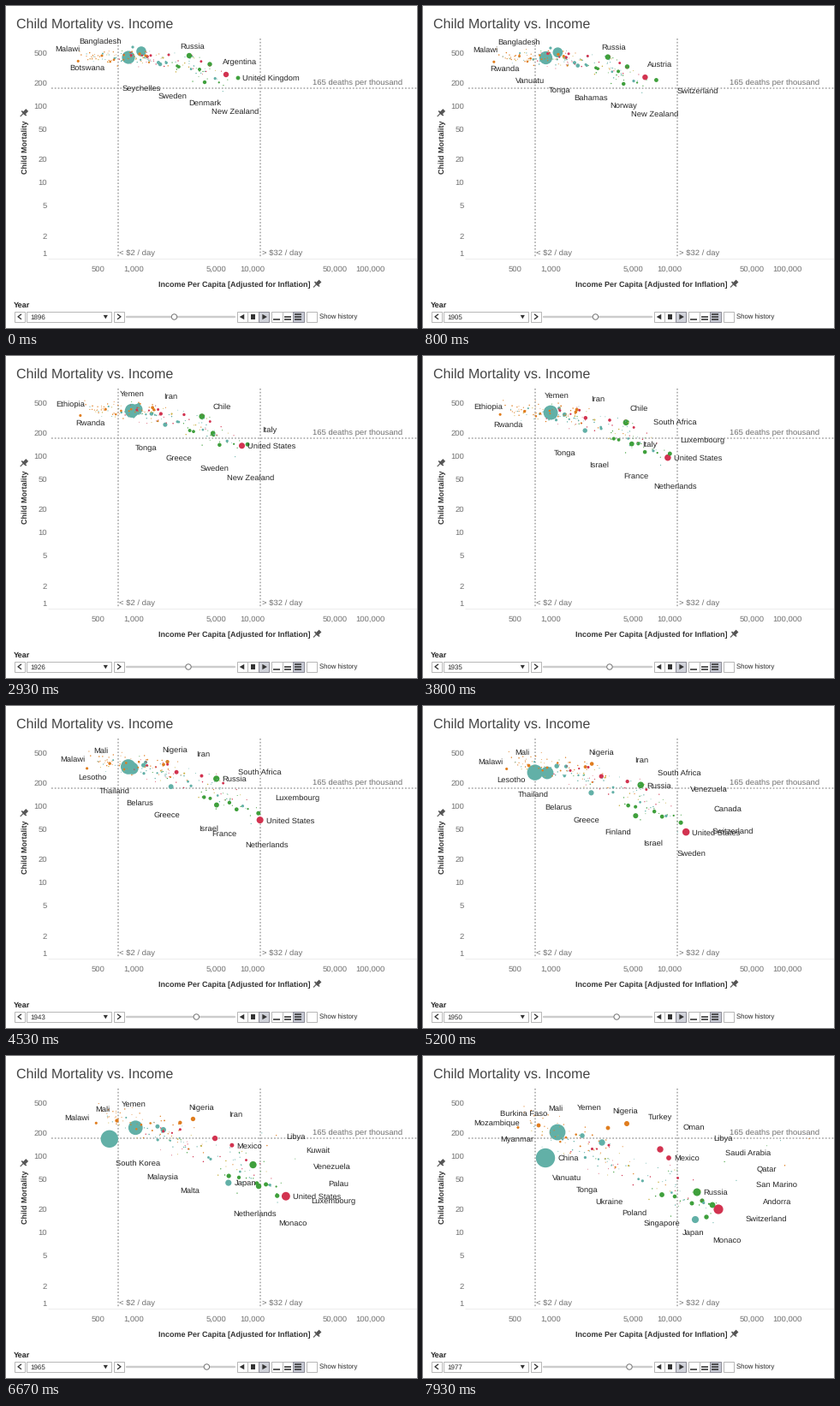
These frames come from a looping animation (480 by 376 pixels, 8000 ms). A matplotlib script:

```python
import matplotlib.pyplot as plt
import numpy as np
from matplotlib.animation import FuncAnimation
from matplotlib.patches import Circle, Polygon, Rectangle

W, H, DPI = 480, 376, 100
PX = 72 / DPI
FRAMES, STEP = 160, 50
FIRST, LAST = 1896, 1977
YEAR_MS = 97.5

plt.rcParams["font.family"] = "Liberation Sans"
plt.rcParams["text.hinting"] = "none"

TEAL, GREEN, RED = "#62b0a7", "#3fa03c", "#d23350"
ORANGE, YELLOW = "#e07d1e", "#cdb44a"
INK, DARK, GREY, LINE = "#262626", "#333333", "#707070", "#b8b8b8"

fig = plt.figure(figsize=(W / DPI, H / DPI), dpi=DPI, facecolor="white")


def pixel_axes(x0, y0, x1, y1):
    """Transparent axes whose data units are stage pixels, y downwards."""
    ax = fig.add_axes([x0 / W, 1 - y1 / H, (x1 - x0) / W, (y1 - y0) / H])
    ax.set(xlim=(x0, x1), ylim=(y1, y0))
    ax.axis("off")
    return ax


stage = pixel_axes(0, 0, W, H)
plot = pixel_axes(53, 37, W, 295)


def write(x, y, text, size=9.5, color=GREY, ax=stage, **kw):
    """Text whose capitals are centred on y."""
    return ax.text(x, y + 0.36 * size, text, fontsize=size * PX, color=color,
                   va="baseline", **kw)


def stroke(xs, ys, color=LINE, width=1.0, **kw):
    kw.setdefault("solid_capstyle", "butt")
    stage.plot(xs, ys, color=color, lw=width * PX, **kw)


def dotted(xs, ys):
    stroke(xs, ys, "#adadad", 1.7, linestyle=(0, (1, 1.25)),
           dash_capstyle="butt")


def box(x, width, fill="white", edge=LINE):
    stage.add_patch(Rectangle((x, 356.5), width, 12.5, fc=fill, ec=edge,
                              lw=PX, zorder=2))


def polygon(x, y, r, sides, turn):
    """Regular control glyph centred on (x, y)."""
    a = turn + 2 * np.pi * np.arange(sides) / sides
    stage.add_patch(Polygon(np.column_stack([x + r * np.cos(a),
                                             y + r * np.sin(a)]),
                            fc=DARK, ec="none", zorder=4))


def pin(x, y):
    stroke([x - 4.5, x], [y + 4, y - 0.5], "#555555", 1.1)
    stroke([x - 3, x + 2.5], [y - 2.5, y + 3], "#555555", 1.6)
    stroke([x - 1, x + 3.5], [y + 1, y - 3.5], "#555555", 4)


# --- chart frame: log scales -------------------------------------------------
def income_x(dollars):
    return 108 + 138 * np.log10(dollars / 500)


def deaths_y(rate):
    return 54 + 89.3 * np.log10(500 / rate)


write(12, 19.5, "Child Mortality vs. Income", 16, "#444444")
for rate in (500, 200, 100, 50, 20, 10, 5, 2, 1):
    write(48, min(deaths_y(rate), 288.5), str(rate), ha="right")
for dollars in (500, 1000, 5000, 10000, 50000, 100000):
    write(income_x(dollars), 306.5, f"{dollars:,}", ha="center")

stroke([49, W], [294.5, 294.5], "#ededed")
for per_day, sign in ((2, "<"), (32, ">")):
    x = income_x(per_day * 365)
    dotted([x, x], [38, 294])
    write(x + 1.8, 288, f"{sign} ${per_day} / day")
dotted([53, W], [deaths_y(165) - 0.5] * 2)
write(358, 88.5, "165 deaths per thousand")

write(178, 324.5, "Income Per Capita [Adjusted for Inflation]", 9, DARK,
      weight="bold")
stage.text(22.5, 165, "Child Mortality", fontsize=9 * PX, color=DARK,
           weight="bold", rotation=90, ha="center", va="center")
pin(363.5, 324.5)
pin(21.2, 125)

# --- year control ------------------------------------------------------------
write(9, 348.5, "Year", 9.2, INK, weight="bold")
box(24, 99)
for x, d in ((10, -2), (126, 2)):
    box(x, 12)
    stroke([x + 6 - d, x + 6 + d, x + 6 - d], [359.8, 362.8, 365.8], DARK,
           1.3, zorder=4)
polygon(116.3, 362.4, 3, 3, np.pi / 2)
year_text = write(28, 362.7, "", 8, INK, zorder=4)

stroke([141, 267], [363, 363], "#cccccc", 2.4, solid_capstyle="round")
knob = stage.add_patch(Circle((0, 363), 3.2, fc="white", ec="#777777",
                              lw=PX, zorder=4))

for i, (sides, turn) in enumerate(((3, np.pi), (4, np.pi / 4), (3, 0))):
    x = 270 + 12.4 * i
    if i < 2:
        box(x, 12.4)
    else:
        box(x, 12.4, "#d0d2da", "#8e8e98")
    polygon(x + 6.4, 363, 3.7, sides, turn)
for i in range(3):
    x = 310 + 12.5 * i
    if i < 2:
        box(x, 12.5)
    else:
        box(x, 12.5, "#c6c9d4", "#8e8e98")
    for row in range(i + 1):
        stroke([x + 2.3, x + 10.3], [366.2 - 3 * row] * 2, DARK, 1.6, zorder=4)
box(351, 11.5)
write(366.3, 363, "Show history", 7.8, INK)

# --- large countries: a short path each, walked at a quickening pace ----------
tracks = {}


def progress(year, power=1.7):
    return ((year - FIRST) / (LAST - FIRST)) ** power


def country(name, color, r0, r1, *path):
    tracks[name] = (color, r0, r1, np.array(path, float))


def track_at(name, year):
    _, r0, r1, path = tracks[name]
    s, knots = progress(year), np.linspace(0, 1, len(path))
    x, y = (np.interp(s, knots, path[:, i]) for i in (0, 1))
    return x, y, r0 + (r1 - r0) * progress(year, 2)


country("China", TEAL, 7.6, 11.2, (143, 60), (150, 67), (112, 88), (143, 119))
country("India", TEAL, 5.8, 9.4, (158, 53), (145, 78), (157, 89))
country("United States", RED, 3.2, 5.6, (257, 80), (307, 147), (345, 179))
country("Russia", GREEN, 3.2, 4.5, (214, 58), (254, 92), (320, 159))
country("Japan", TEAL, 2.3, 4.1, (180, 68), (196, 101), (318, 191))
country("Brazil", RED, 1.8, 3.7, (165, 59), (208, 82), (277, 109))
country("Indonesia", TEAL, 2, 3.7, (178, 66), (156, 70), (209, 101))
country("Germany", GREEN, 2.7, 3.4, (238, 68), (248, 128), (338, 174))
country("United Kingdom", GREEN, 2.4, 2.7, (271, 84), (331, 188))
country("France", GREEN, 2.2, 2.6, (232, 89), (326, 169))
country("Italy", GREEN, 2, 2.5, (226, 74), (314, 172))
country("Ukraine", GREEN, 1.8, 2.9, (200, 70), (279, 162))
country("Poland", GREEN, 1.8, 2.3, (202, 71), (294, 164))
country("Mexico", RED, 1.5, 2.9, (190, 57), (287, 119))
country("Pakistan", TEAL, 1.6, 2.8, (148, 48), (186, 93))
country("Nigeria", ORANGE, 1.7, 3, (156, 56), (238, 79))
country("Egypt", ORANGE, 1.6, 2.4, (163, 58), (216, 84))
country("Ethiopia", ORANGE, 1.5, 2.4, (112, 58), (135, 81))

# --- small countries: a cloud that slides and straightens ----------------------
rng = np.random.default_rng(11)
N, OIL = 160, 6
rank = rng.beta(1.3, 1.6, N)
off_x, off_y = rng.normal(0, 1, (2, N))
rate = rng.uniform(0.3, 1.3, (2, N))
phase = rng.uniform(0, 2 * np.pi, (2, N))
small_r = rng.uniform(0.4, 0.75, N)
medium = rng.random(N) < 0.14
small_r[medium] += rng.uniform(0.3, 1.1, medium.sum())
oil_end = rng.uniform((330, 95), (455, 150), (OIL, 2))


def region(u):
    """Poor ranks lean African, middle ones mixed, rich ones European."""
    lean = np.array([6 * (1 - u) ** 3, 2.2 - u, 4 * u * (1 - u), 6 * u ** 3,
                     0.8])
    return rng.choice([ORANGE, TEAL, RED, GREEN, YELLOW], p=lean / lean.sum())


small_colors = np.array([region(u) for u in rank])
african = small_colors == ORANGE


def cloud(year):
    t, s = progress(year, 1), progress(year)
    sway = 1.5 * np.sin(rate * (year - FIRST) + phase)
    x = 88 + 27 * s + (184 + 63 * s) * rank + 8 * off_x + sway[0]
    y = (59 + 19 * s + (45 + 67 * s) * rank ** (4 - 2.9 * t) - 9 * s * african
         + (6 + 6 * s) * (0.4 + rank) * off_y + sway[1])
    points = np.column_stack([x, y])
    points[:OIL] += (oil_end - points[:OIL]) * t ** 4
    return points


# --- labels: strung along two curves around the cloud, or beside a bubble ------
CURVES = {
    "over": (np.array([(72, 50), (120, 30), (255, 32), (318, 96)]),
             np.array([(86, 78), (200, 20), (480, 110), (401, 190)])),
    "under": (np.array([(95, 72), (140, 98), (210, 104), (268, 123)]),
              np.array([(110, 97), (160, 140), (230, 190), (355, 215)])),
}
label_sets = []


def labels(year, over, under, beside=""):
    """Names run left to right; an empty name leaves a gap."""
    spots = {}
    for side, text in (("over", over), ("under", under), ("beside", beside)):
        row = [name.strip() for name in text.split(",")]
        for i, name in enumerate(row):
            if name:
                spots[name] = (side, i / max(len(row) - 1, 1))
    label_sets.append((year, spots))


labels(1896, "Malawi, Bangladesh, , Russia, Argentina, ",
       "Botswana, , Seychelles, Sweden, Denmark, New Zealand",
       "United Kingdom")
labels(1905, "Malawi, Bangladesh, , Russia, Austria, Switzerland",
       "Rwanda, Vanuatu, Tonga, Bahamas, Norway, New Zealand")
labels(1917, ", South Korea, Pakistan, Libya, Chile, Italy, ",
       "Rwanda, Armenia, Seychelles, Greece, Sweden, New Zealand",
       "United States")
labels(1935, "Ethiopia, , Yemen, Iran, Chile, South Africa, Luxembourg, ",
       "Rwanda, , Tonga, Israel, France, Netherlands", "Italy, United States")
labels(1950, "Malawi, Mali, , Nigeria, Iran, South Africa, Venezuela, Canada, "
       "Switzerland",
       "Lesotho, Thailand, Belarus, Greece, Finland, Israel, Sweden",
       "Russia, United States")
labels(1965, "Malawi, Mali, Yemen, , Nigeria, Iran, , Libya, Kuwait, "
       "Venezuela, Palau, Luxembourg",
       ", , South Korea, Malaysia, Malta, , Netherlands, Monaco",
       "Mexico, Japan, United States")
labels(1977, "Mozambique, Burkina Faso, Mali, Yemen, Nigeria, Turkey, Oman, "
       "Libya, Saudi Arabia, Qatar, San Marino, Andorra, Switzerland",
       "Myanmar, , , Vanuatu, Tonga, Ukraine, Poland, Singapore, Japan, "
       "Monaco", "China, Mexico, Russia")

names = sorted(set().union(*(spots for _, spots in label_sets)))
tags = {name: write(0, 0, name, 9.4, INK, plot, clip_on=True, zorder=5)
        for name in names}


def on_curve(side, s, year):
    start, end = CURVES[side]
    p = start + (end - start) * progress(year, 1.6)
    weights = np.array([(1 - s) ** 3, 3 * s * (1 - s) ** 2,
                        3 * s ** 2 * (1 - s), s ** 3])
    return weights @ p


def spot_at(name, year):
    """Side and curve parameter of a label, or None while it is hidden."""
    years = [y for y, _ in label_sets]
    k = min(np.searchsorted(years, year, "right") - 1, len(years) - 2)
    f = (year - years[k]) / (years[k + 1] - years[k])
    a, b = (label_sets[i][1].get(name) for i in (k, k + 1))
    if a and b and a[0] == b[0]:
        return a[0], a[1] + f * (b[1] - a[1])
    if a and f < 0.3 + 0.4 * a[1]:
        return a
    if b and f >= 0.3 + 0.4 * b[1]:
        return b
    return None


def place(name, tag, year):
    spot = spot_at(name, year)
    tag.set_visible(spot is not None)
    if spot is None:
        return
    side, s = spot
    if side == "beside":
        x, y, r = track_at(name, year)
        x += r + 3
    else:
        x, y = on_curve(side, s, year)
    tag.set_ha("left" if side == "beside" else "center")
    tag.set_position((x, y + 3.4))


# --- animation -------------------------------------------------------------------
blank = np.zeros(len(tracks) + N)
marks = plot.scatter(blank, blank, linewidths=0, zorder=3,
                     c=[t[0] for t in tracks.values()] + list(small_colors))


def draw(frame):
    year = min(FIRST + int(frame * STEP / YEAR_MS + 0.9), LAST)
    big = np.array([track_at(name, year) for name in tracks])
    marks.set_offsets(np.vstack([big[:, :2], cloud(year)]))
    marks.set_sizes((2 * PX * np.concatenate([big[:, 2], small_r])) ** 2)
    for name, tag in tags.items():
        place(name, tag, year)
    year_text.set_text(str(year))
    knob.center = (196.5 + 44.5 * progress(year, 1), 363)
    return [marks, knob, year_text, *tags.values()]


anim = FuncAnimation(fig, draw, frames=FRAMES, interval=STEP, repeat=True,
                     repeat_delay=0, blit=False)
plt.show()
```
